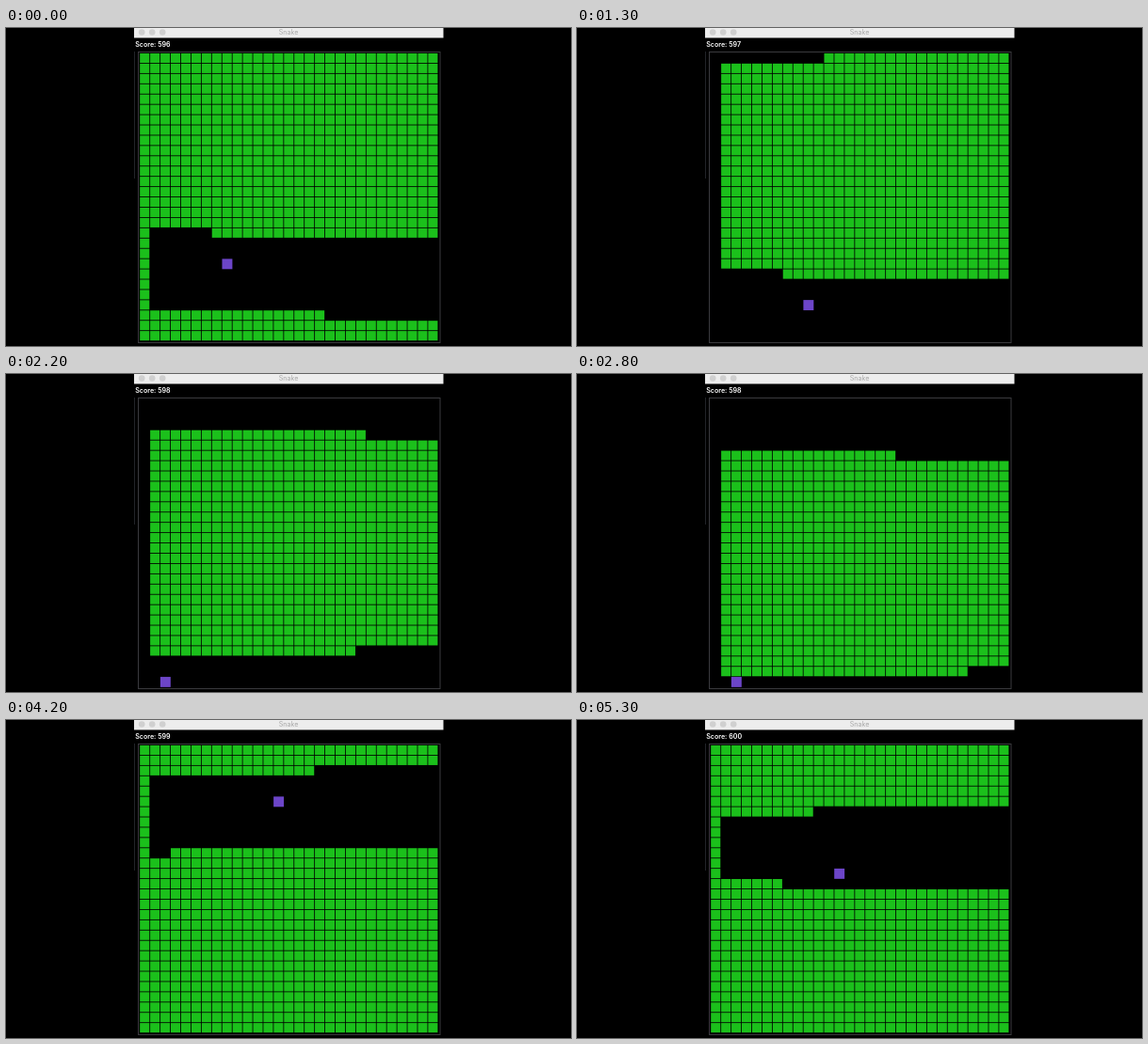
An HTML page with a canvas that plays this animation: 600x338 px, repeating every 5400 ms.

```html
<!DOCTYPE html>
<html>
<head>
<meta charset="utf-8">
<title>Snake</title>
<style>
  html, body { margin: 0; width: 100%; height: 100%; overflow: hidden; background: #000; }
  canvas { display: block; }
</style>
</head>
<body>
<canvas id="stage" width="600" height="338"></canvas>
<script>
const ctx = document.getElementById('stage').getContext('2d');
const LOOP = 5400, TICK = 100;
const ROWS = 28, RUN = 28, LAP = ROWS * RUN + ROWS;
const PITCH = 328 / 30, LEFT = 142.2, TOP = 26.9, CELL = 10.1;

// [tick, distance of the head along the circuit]
const pace = [[0, 497], [5, 540], [13, 609], [22, 691], [34, 811], [42, 883], [53, 988]];
const foods = [[8, 20], [9, 24], [2, 27], [13, 5], [12, 12]];
const eatenAt = [567, 680, 782, 967];

function headAt(tick) {
  const i = pace.findIndex(p => p[0] >= tick);
  if (i === 0) return pace[0][1];
  const [t0, d0] = pace[i - 1], [t1, d1] = pace[i];
  return Math.round(d0 + (d1 - d0) * (tick - t0) / (t1 - t0));
}

// The circuit sweeps down row by row, then climbs back up column 0.
function cellAt(distance) {
  const d = (distance + LAP) % LAP;
  if (d >= ROWS * RUN) return [0, LAP - 1 - d];
  const row = Math.floor(d / RUN), step = d % RUN;
  return [row % 2 ? RUN - step : step + 1, row];
}

function rect(color, x, y, w, h) {
  ctx.fillStyle = color;
  ctx.fillRect(x, y, w, h);
}

function text(str, x, y, color, weight, align) {
  ctx.font = `${weight} 7.1px Inter, sans-serif`;
  ctx.textAlign = align;
  ctx.fillStyle = color;
  ctx.fillText(str, x, y);
}

function drawWindow(score) {
  rect('#000', 0, 0, 600, 338);
  rect('#222428', 136, 25, 1, 135);
  rect('#ededed', 136, 0, 328.5, 10.5);
  for (const x of [144.2, 155.2, 166.2]) {
    ctx.fillStyle = '#d0d0d0';
    ctx.beginPath();
    ctx.arc(x, 4.5, 3.3, 0, 7);
    ctx.fill();
  }
  text('Snake', 300, 7.2, '#a6a6a6', 400, 'center');
  text('Score: ' + score, 137.2, 19.7, '#fff', 600, 'left');
  ctx.strokeStyle = '#3a3a3e';
  ctx.lineWidth = 1;
  ctx.strokeRect(140.5, 25.5, 320.5, 309);
}

function draw(tick) {
  const head = headAt(tick);
  const eaten = eatenAt.filter(d => d <= head).length;
  const score = 596 + eaten;
  drawWindow(score);
  for (let i = 0; i < score + 3; i++) {
    const [col, row] = cellAt(head - i);
    rect('#1bc01b', LEFT + col * PITCH, TOP + row * PITCH, CELL, CELL);
  }
  const [col, row] = foods[eaten];
  rect('#6c45c8', LEFT + col * PITCH - 0.2, TOP + row * PITCH - 0.2, PITCH, PITCH);
}

function frame() {
  draw(Math.floor(performance.now() % LOOP / TICK));
  requestAnimationFrame(frame);
}
frame();
</script>
</body>
</html>
```
